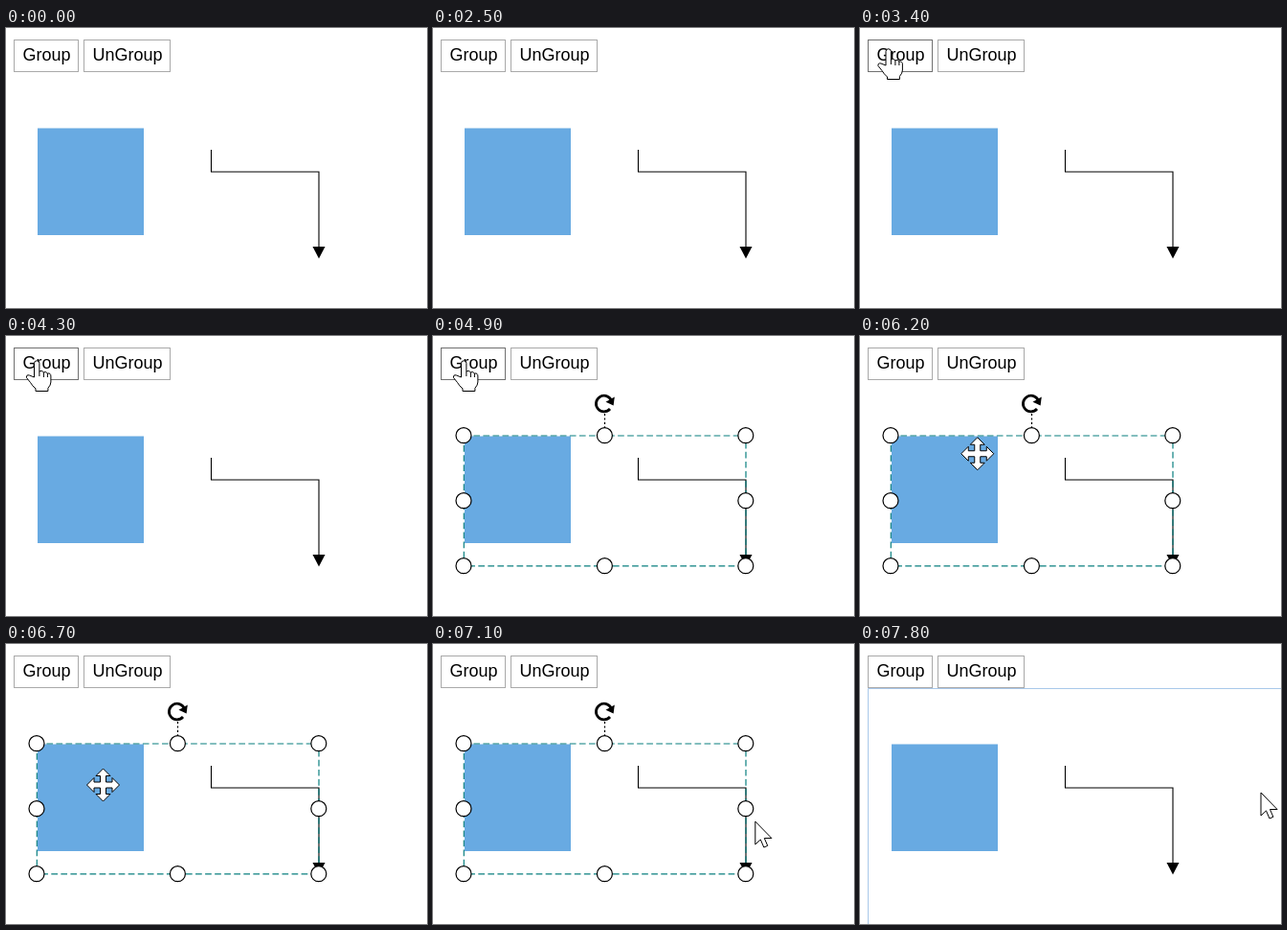
Recreate the animation shown at these times as an HTML page. Size 440 by 292 pixels, loop 8 s.

```html
<!DOCTYPE html>
<html lang="en">
<head>
<meta charset="utf-8">
<title>Group and ungroup</title>
<style>
  html, body { margin: 0; width: 100%; height: 100%; overflow: hidden; background: #fff; }
  svg { display: block; width: 440px; height: 292px; }
  text { font: 18px "Liberation Sans", Arial, sans-serif; }
  .button { fill: #fff; stroke: #a9a9a9; }
  .cursor { fill: #fff; stroke: #000; stroke-linejoin: round; }
</style>
</head>
<body>
<svg viewBox="0 0 440 292">
  <rect class="button" id="groupButton" x="8.5" y="12.5" width="67" height="33"/>
  <rect class="button" x="81.5" y="12.5" width="90" height="33"/>
  <text x="17.5" y="34">Group</text>
  <text x="90.5" y="34">UnGroup</text>

  <path id="focus" d="M440 46.5H8.5V292" fill="none" stroke="#a9c8ea"/>
  <rect x="33" y="104.5" width="111" height="111.5" fill="#68aae2"/>
  <path d="M214.5 127V150H327V228" fill="none" stroke="#000" stroke-width="1.1"/>
  <path d="M320.5 228H333.5L327 240.5Z"/>

  <g id="selection">
    <rect x="32.3" y="104" width="294.7" height="135.8" fill="none" stroke="#097f7f" stroke-width="1.2" stroke-dasharray="6.7 3.35"/>
    <path d="M179.5 81V96" stroke="#000" stroke-width="1.2" stroke-dasharray="2.2 2.2"/>
    <path d="M185 76A8.3 8.3 0 1 1 186 66.5" fill="none" stroke="#000" stroke-width="2.8"/>
    <path d="M189.8 63.5L188.6 72.5 180.5 68.8Z"/>
    <g id="handles" fill="#fff" stroke="#000" stroke-width="1.2"></g>
  </g>

  <path class="cursor" id="arrow" d="M.5.5V24.5L6 19.4 9.5 27.5 13.4 25.8 10 18H17.6Z"/>
  <path class="cursor" id="hand" d="M-3 17V2.5a2.7 2.7 0 0 1 5.4 0V11q2.5-2 4.5 .8q2.5-1.2 4 1.2q3.5-.6 3.5 3V22q0 3-3 6.5V31.5H-1.5V29Q-5 26-7 22.5L-11 17.5q-.5-3.5 3-2.5zM2.4 11v5M6.9 12v5M10.9 13v4"/>
  <path class="cursor" id="move"/>
</svg>
<script>
const LOOP = 8000, TICK = 100;
const el = id => document.getElementById(id);
const show = (id, on) => el(id).style.display = on ? "" : "none";

// Pointer moves; bend is the sideways dip of the path
const entry = { x: 142, y: 78 };
const moves = [
  { from: 2900, to: 3400, x: 30, y: 22, bend: -24 },
  { from: 3500, to: 3700, x: 32.5, y: 26, bend: 0 },
  { from: 5400, to: 5900, x: 144, y: 98.5, bend: 0 },
  { from: 5900, to: 6500, x: 101.5, y: 147, bend: 0 },
  { from: 6700, to: 7300, x: 418.5, y: 154.5, bend: 44 }
];

for (let i = 0; i < 9; i++)
  if (i !== 4)
    el("handles").innerHTML += `<circle cx="${32 + i % 3 * 147.4}" cy="${103.7 + Math.floor(i / 3) * 68}" r="8"/>`;

// One arm of the four-way pointer, turned by quarter circles
const arm = [[-3, -3], [-3, -9.5], [-7.5, -9.5], [0, -17], [7.5, -9.5], [3, -9.5]];
const outline = [];
for (let turn = 0; turn < 4; turn++) {
  outline.push(...arm);
  arm.forEach((p, i) => arm[i] = [-p[1], p[0]]);
}
el("move").setAttribute("d", `M${outline.join("L")}Z`);

function pointer(t) {
  let { x, y } = entry;
  for (const m of moves) {
    const k = Math.min(1, Math.max(0, (t - m.from) / (m.to - m.from)));
    const ease = k * k * (3 - 2 * k);
    x += (m.x - x) * ease;
    y += (m.y - y) * ease + m.bend * Math.sin(Math.PI * ease);
  }
  return [x, y];
}

const inside = (x, y, l, t, r, b) => x >= l && x <= r && y >= t && y <= b;

function draw(now) {
  const t = Math.floor(now % LOOP / TICK) * TICK;
  const selected = t >= 4800 && t < 7800;
  const visible = t >= 2900;
  const [x, y] = pointer(t);
  const overGroup = visible && inside(x, y, 8, 12, 76, 46);
  const overButton = overGroup || inside(x, y, 81, 12, 172, 46);
  const kind = overButton ? "hand"
    : selected && inside(x, y, 32, 103, 327, 240) ? "move" : "arrow";

  show("selection", selected);
  show("focus", t >= 7800);
  el("groupButton").style.stroke = overGroup ? "#707070" : "";
  for (const id of ["arrow", "hand", "move"]) show(id, visible && id === kind);
  el(kind).setAttribute("transform", `translate(${x} ${y})`);
}

const start = performance.now();
function frame() {
  draw(performance.now() - start);
  requestAnimationFrame(frame);
}
frame();
</script>
</body>
</html>
```
